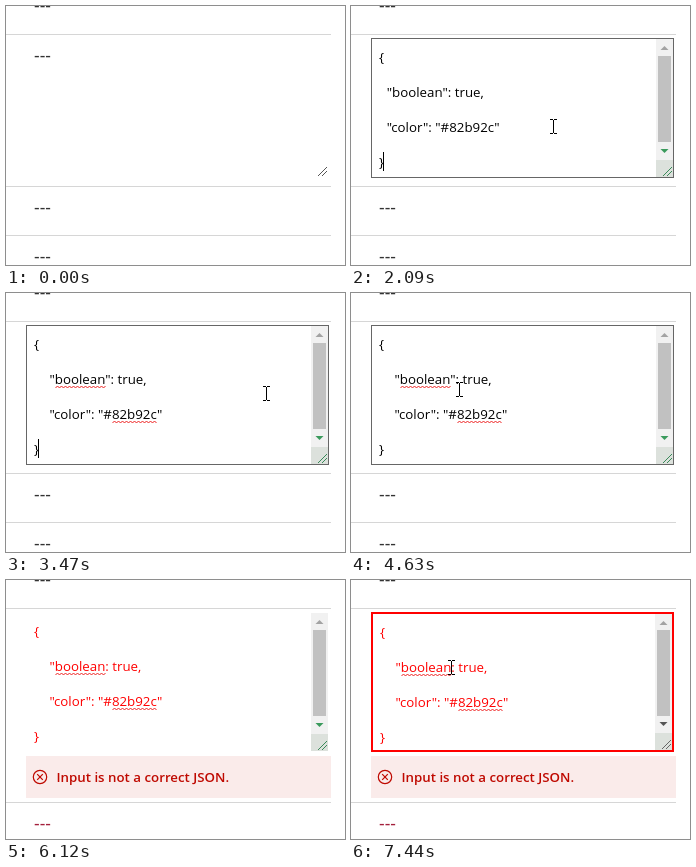
Write an HTML page with a canvas that moves like this. It is 339 px wide and 259 px high and loops after 7990 ms.

```html
<!DOCTYPE html>
<html lang="en">
<head>
<meta charset="utf-8">
<title>JSON field validation</title>
<style>
  html, body { margin: 0; width: 100%; height: 100%; overflow: hidden; background: #fff; }
  canvas { display: block; }
</style>
</head>
<body>
<canvas id="stage" width="339" height="259"></canvas>
<script>
const ctx = document.getElementById('stage').getContext('2d');
const LOOP = 7990;
const FAMILY = '"Open Sans", "Noto Sans", sans-serif';
const PASTE = 2090, REINDENT = 3010, DELETE_QUOTE = 5010, INVALID = 6040;

// Stepped pointer moves: visible from start until the given end.
const moves = [
  { start: 590, end: 2610, steps: 4, every: 83.4, from: [313, 200], to: [202, 120] },
  { start: 2610, end: 2690, steps: 1, every: 80, from: [276, 112], to: [276, 112] },
  { start: 3470, end: 4250, steps: 9, every: 77.5, from: [260, 100], to: [104, 92] },
  { start: 4250, end: 4400, steps: 1, every: 75, from: [104, 92], to: [104, 92] },
  { start: 4400, end: 5650, steps: 1, every: 75, from: [108, 96], to: [108, 96] },
  { start: 5650, end: 5800, steps: 2, every: 75, from: [160, 99], to: [272, 106] },
  { start: 6980, end: LOOP, steps: 7, every: 76.6, from: [286, 112], to: [100, 87] }
];
const clicks = [[990, 1100], [4250, 4325]];
// Caret visibility: from, to, x, text line
const carets = [
  [1100, 1540, 28, 0], [2090, 2610, 32, 3], [3320, 3850, 32, 3],
  [4325, 4630, 105, 1], [5180, 5650, 99, 1]
];
const within = (t, from, to) => t >= from && t < to;

function rect(color, x, y, w, h) {
  ctx.fillStyle = color;
  ctx.fillRect(x, y, w, h);
}

function text(value, x, y, color, size = 13.3, weight = 400) {
  ctx.font = `${weight} ${size}px ${FAMILY}`;
  ctx.fillStyle = color;
  ctx.fillText(value, x, y);
}

function path(points, color, width = 1) {
  ctx.beginPath();
  points.forEach(([x, y], i) => i ? ctx.lineTo(x, y) : ctx.moveTo(x, y));
  ctx.strokeStyle = color;
  ctx.lineWidth = width;
  ctx.stroke();
}

function polygon(points, color) {
  ctx.beginPath();
  points.forEach(p => ctx.lineTo(...p));
  ctx.closePath();
  ctx.fillStyle = color;
  ctx.fill();
}

function disc(x, y, r, color) {
  ctx.beginPath();
  ctx.arc(x, y, r, 0, 2 * Math.PI);
  ctx.fillStyle = color;
  ctx.fill();
}

const divider = y => rect('#d6d6d6', 0, y, 325, 1);
const dashes = (y, color = '#333') => text('---', 28, y + 4.7, color, 17.5);

function squiggle(x, end, y) {
  const points = [];
  for (let i = 0; x + i <= end; i += 2) points.push([x + i, y + (i % 4 ? 0 : 2)]);
  path(points, '#e22', 1);
}

function grip(x, y, color) {
  path([[x - 9, y], [x, y - 9]], color);
  path([[x - 5, y], [x, y - 5]], color);
}

function scrollbar(shift) {
  const x = 305 - shift;
  rect('#f1f1f1', x, 33 + shift, 17, 138 - 2 * shift);
  rect('#c1c1c1', x + 2, 50, 13, 86);
  const mid = x + 8.5, up = 44 + shift, down = 143 - shift;
  polygon([[mid - 4, up], [mid + 4, up], [mid, up - 4]], '#a3a3a3');
  polygon([[mid - 4, down], [mid + 4, down], [mid, down + 4]], shift ? '#555' : '#3a9a5c');
  rect('#dce1dc', x, 154 - shift, 17, 17);
  grip(x + 16, 170 - shift, shift ? '#666' : '#3a8a5a');
}

function json(t, shift) {
  const color = t < INVALID ? '#000' : '#f00';
  const indent = t < REINDENT ? 35.7 : 43.4;
  const key = t < DELETE_QUOTE ? '"boolean":' : '"boolean:';
  ctx.save();
  ctx.translate(shift, shift);
  text('{', 28, 56, color);
  text(key + ' true,', indent, 91, color);
  text('"color": "#82b92c"', indent, 126, color);
  text('}', 28, 161, color);
  if (within(t, 2150, REINDENT) || t >= 3320) {
    const x = Math.round(indent);
    squiggle(x + 6.5, x + 56.5, 93);
    squiggle(x + 63.5, x + 108.5, 128);
  }
  ctx.restore();
}

function errorBanner(opacity) {
  ctx.globalAlpha = opacity;
  rect('#faebea', 20, 176, 305, 42);
  const red = '#bf0900';
  ctx.beginPath();
  ctx.arc(34, 197, 6.7, 0, 2 * Math.PI);
  ctx.strokeStyle = red;
  ctx.lineWidth = 1.2;
  ctx.stroke();
  path([[31.2, 194.2], [36.8, 199.8]], red, 1.2);
  path([[36.8, 194.2], [31.2, 199.8]], red, 1.2);
  text('Input is not a correct JSON.', 50.5, 202, red, 13.3, 600);
  ctx.globalAlpha = 1;
}

function pointerAt(t) {
  const move = moves.find(m => within(t, m.start, m.end));
  if (!move) return null;
  const { start, steps, every, from, to } = move;
  const step = Math.min(steps - 1, Math.floor((t - start) / every));
  const p = steps > 1 ? step / (steps - 1) : 1;
  const eased = 1 - (1 - p) ** 1.6;
  return from.map((v, i) => Math.round(v + (to[i] - v) * eased));
}

function iBeam(x, y) {
  const shape = [
    [[x - 3, y - 6.5], [x, y - 6.5]], [[x + 1, y - 6.5], [x + 4, y - 6.5]],
    [[x + .5, y - 6], [x + .5, y + 7]],
    [[x - 3, y + 7.5], [x, y + 7.5]], [[x + 1, y + 7.5], [x + 4, y + 7.5]]
  ];
  shape.forEach(line => path(line, '#000'));
}

function arrow(x, y) {
  const shape = [[0, 0], [0, 16], [4, 12.5], [6.5, 18], [9, 17], [6.5, 11.5], [11, 11.5]]
    .map(([dx, dy]) => [x + .5 + dx, y + .5 + dy]);
  polygon(shape, '#fff');
  path([...shape, shape[0]], '#000');
}

function draw(t) {
  const pointer = pointerAt(t);
  const hovered = pointer && pointer[0] < 323 && pointer[1] < 172;
  const invalid = t >= INVALID;
  const shift = invalid && hovered ? 1 : 0;

  rect('#fff', 0, 0, 339, 259);
  dashes(1.5);
  divider(28);
  if (invalid) {
    errorBanner(t < 6120 ? .5 : 1);
    divider(222);
    dashes(245, '#a4203c');
  } else {
    divider(180);
    dashes(203);
    divider(229);
    dashes(252);
  }

  if (t < PASTE) {
    dashes(51.7);
    grip(321, 170, '#555');
  } else {
    scrollbar(shift);
    json(t, shift);
  }

  if (hovered) {
    const w = invalid ? 2 : 1;
    ctx.strokeStyle = invalid ? '#f00' : '#666';
    ctx.lineWidth = w;
    ctx.strokeRect(20 + w / 2, 32 + w / 2, 303 - w, 140 - w);
  }

  for (const [from, to, x, line] of carets)
    if (within(t, from, to)) rect('#000', x, 41 + 35 * line, 1, 19);

  if (!pointer) return;
  const [x, y] = pointer;
  if (clicks.some(([from, to]) => within(t, from, to))) {
    ctx.globalCompositeOperation = 'multiply';
    disc(x - 2, y - 1, 12, '#ffff80');
    ctx.globalCompositeOperation = 'source-over';
  }
  (hovered ? iBeam : arrow)(x, y);
}

const begin = performance.now();
function frame() {
  draw((performance.now() - begin) % LOOP);
  requestAnimationFrame(frame);
}
frame();
</script>
</body>
</html>
```
